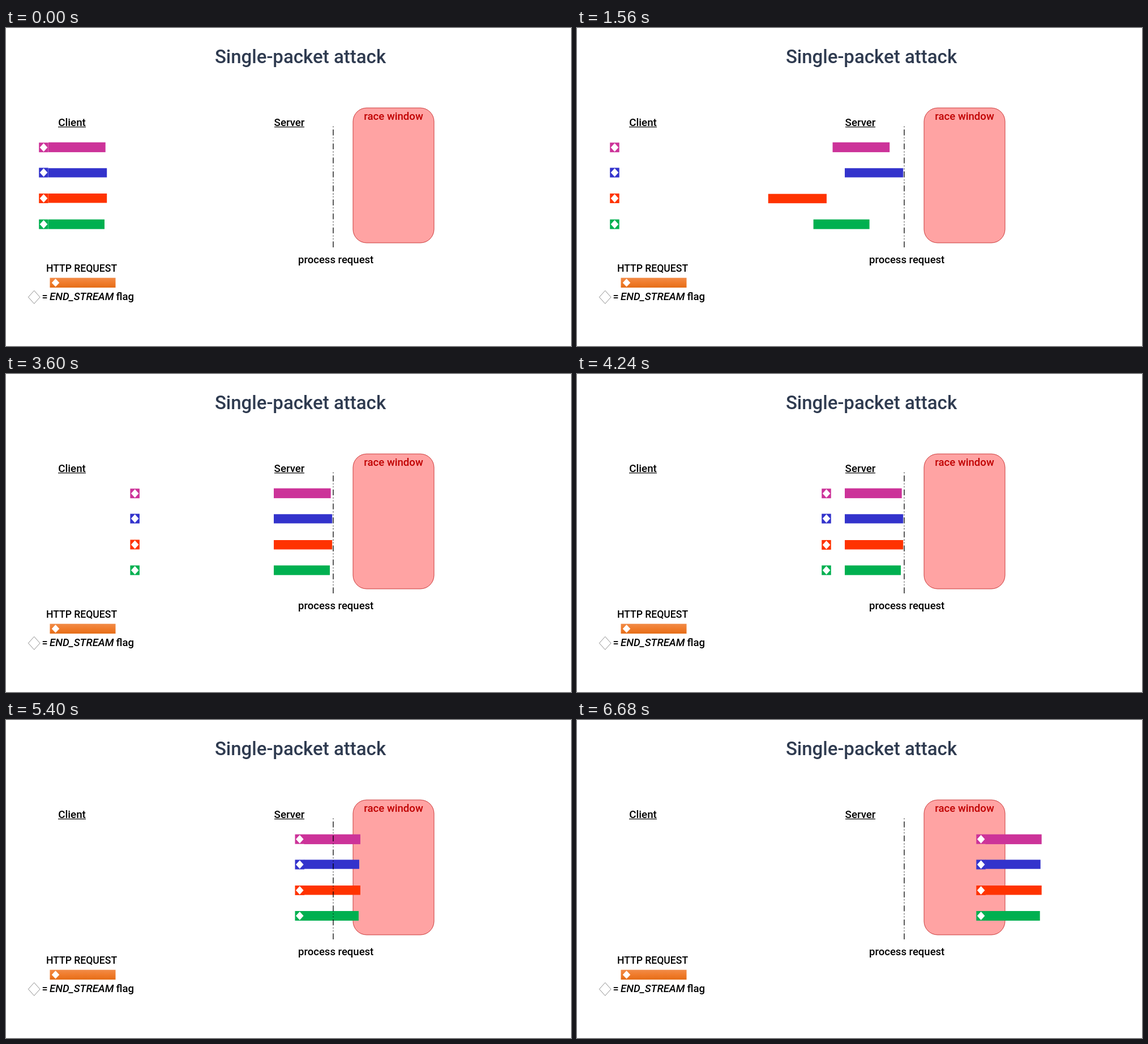
Animation, 998 px wide and 561 px high, one loop 6720 ms. Source, as an HTML page with a canvas:

```html
<!DOCTYPE html>
<html lang="en">
<head>
<meta charset="utf-8">
<title>Single-packet attack</title>
<style>
  html, body { margin: 0; width: 100%; height: 100%; overflow: hidden; background: #fff; }
  canvas { display: block; }
</style>
</head>
<body>
<canvas id="stage" width="998" height="561"></canvas>
<script>
const ctx = document.getElementById('stage').getContext('2d');
const LOOP = 6720, STEP = 40;
const TRAVEL = 398;            // client to server
const FLAGS_START = 2835, FLAGS_TIME = 1700;
const JOIN = 4800, RUN_START = 4828, RUN_TIME = 1730, RUN = 249.3;

// y, w, h: body; flagY: flag top; full, joinY: the joined request
const rows = [
  { color: '#cc3399', y: 201.7, w: 100.7, h: 17.4, flagY: 202.2, full: 115.4, joinY: 201.7, start: 100, time: 1747, drop: 0 },
  { color: '#3333cc', y: 247.3, w: 103.2, h: 16.2, flagY: 246.6, full: 113.4, joinY: 246.5, start: 80, time: 1300, drop: 0 },
  { color: '#ff3300', y: 292, w: 103.2, h: 16.5, flagY: 292, full: 115.4, joinY: 292, start: 120, time: 2450, drop: 1 },
  { color: '#00b050', y: 337.7, w: 99, h: 17, flagY: 337.7, full: 112.4, joinY: 337, start: 95, time: 1990, drop: 0 }
];

// Constant acceleration to the middle, then constant braking
function ease(t, start, time) {
  const u = Math.min(1, Math.max(0, (t - start) / time));
  return u < 0.5 ? 2 * u * u : 1 - 2 * (1 - u) ** 2;
}

function rect(x, y, w, h, fill) {
  ctx.fillStyle = fill;
  ctx.fillRect(x, y, w, h);
}

function diamond(x, y, rx, ry) {
  ctx.beginPath();
  ctx.moveTo(x, y - ry);
  ctx.lineTo(x + rx, y);
  ctx.lineTo(x, y + ry);
  ctx.lineTo(x - rx, y);
  ctx.closePath();
  ctx.fillStyle = '#fff';
  ctx.fill();
}

function text(str, x, y, size, color = '#000', style = '') {
  ctx.font = `${style} 500 ${size}px Roboto, "Open Sans", sans-serif`;
  ctx.fillStyle = color;
  ctx.fillText(str, x, y);
}

function flag(x, y, color) {
  rect(x, y, 16.5, 17, color);
  diamond(x + 8.3, y + 8.5, 6.8, 7.5);
}

function drawWindow() {
  ctx.beginPath();
  ctx.roundRect(613, 141, 143, 238, 24);
  ctx.fillStyle = '#ffa3a3';
  ctx.fill();
  ctx.strokeStyle = '#cc3b3b';
  ctx.lineWidth = 1;
  ctx.stroke();
}

function drawLabels() {
  ctx.textAlign = 'center';
  text('Single-packet attack', 520, 61.5, 33, '#2f3b50');
  text('Client', 116.5, 173, 18.8);
  text('Server', 500.5, 173, 18.7);
  text('race window', 684.5, 162, 18.6, '#c00000');
  text('process request', 582.7, 415, 18.5);
  text('HTTP REQUEST', 133.5, 430, 17.6);
  ctx.textAlign = 'left';
  rect(92, 174, 49, 1.2, '#000');
  rect(474, 174, 53, 1.2, '#000');
  text('=', 63.5, 480, 18);
  text('END_STREAM', 77, 480, 18.5, '#000', 'italic');
  text('flag', 194.5, 480, 18.5);
}

function drawLegend() {
  const g = ctx.createLinearGradient(0, 441, 0, 458);
  g.addColorStop(0, '#f18b47');
  g.addColorStop(0.5, '#f07b2b');
  g.addColorStop(1, '#e46d18');
  rect(77.5, 440.7, 116, 17.3, g);
  diamond(87.5, 449.4, 6.8, 7.2);
  diamond(49.7, 474.8, 10.3, 11.5);
  ctx.strokeStyle = '#808080';
  ctx.lineWidth = 0.9;
  ctx.stroke();
}

function drawLine() {
  ctx.strokeStyle = '#000';
  ctx.lineWidth = 1.3;
  ctx.setLineDash([8, 3, 1, 3, 1, 3].map(n => n * 1.3));
  ctx.beginPath();
  ctx.moveTo(578, 387);
  ctx.lineTo(578, 173);
  ctx.stroke();
  ctx.setLineDash([]);
}

function drawRequests(t) {
  const flagShift = ease(t, FLAGS_START, FLAGS_TIME);
  const run = ease(t, RUN_START, RUN_TIME) * RUN;
  for (const r of rows) {
    if (t >= JOIN) {
      const x = 456 + run;
      rect(x + 16, r.joinY, r.full - 16, r.h, r.color);
      flag(x, r.joinY, r.color);
    } else {
      const p = ease(t, r.start, r.time);
      rect(75 + p * TRAVEL, r.y + r.drop * p, r.w, r.h, r.color);
      flag(58.2 + flagShift * TRAVEL, r.flagY + r.drop * flagShift, r.color);
    }
  }
}

function draw(t) {
  rect(0, 0, 998, 561, '#fff');
  drawWindow();
  drawLabels();
  drawLegend();
  drawRequests(t);
  drawLine();
}

const begin = performance.now();
function tick() {
  const t = (performance.now() - begin) % LOOP;
  draw(Math.floor(t / STEP) * STEP);
  requestAnimationFrame(tick);
}
tick();
</script>
</body>
</html>
```
